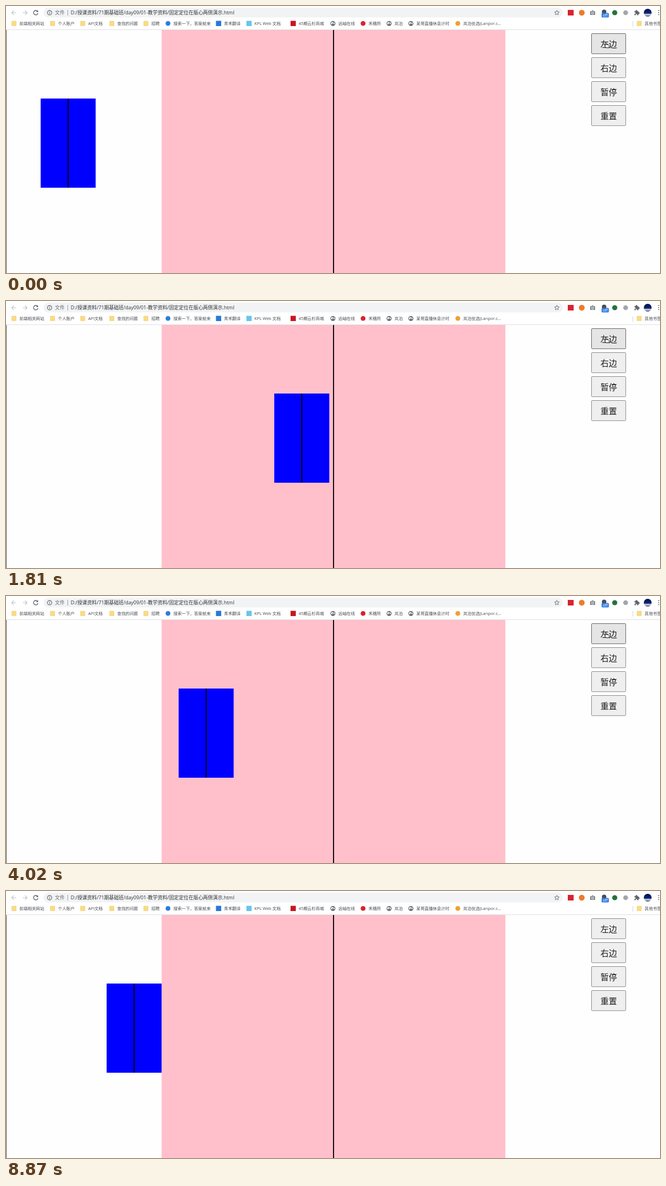
These frames come from a looping animation (1170 px wide and 479 px high, 9240 ms). An HTML page:

```html
<!DOCTYPE html>
<html lang="zh-CN">
<head>
<meta charset="utf-8">
<title>固定定位演示</title>
<style>
  html, body { margin: 0; width: 100%; height: 100%; overflow: hidden; background: #fff; }
  svg { position: absolute; left: 0; top: 0; }
  text { font-family: "Open Sans", "Noto Sans CJK SC", "Noto Sans CJK", sans-serif; }
  .address { font-size: 8.7px; fill: #303134; }
  .bookmark { font-size: 7.4px; fill: #46494d; }
  .button text { font-size: 14.8px; text-anchor: middle; fill: #1c1c1c; }
  .button rect { fill: #efefef; stroke: #8c8c8c; }
  .icon { fill: none; stroke: #5f6368; stroke-width: 1.1; }
  .crisp { shape-rendering: crispEdges; }

  #box { animation: slide 9.24s infinite; }
  .first rect { animation: button 9.24s step-end infinite; }
  #hand { animation: hand 9.24s step-end infinite; }
  #arrow { animation: arrow 9.24s step-end infinite; }

  /* Three linear moves: to the centre, back half the column, back half the box. */
  @keyframes slide {
    0% { transform: translateX(62px); animation-timing-function: step-end; }
    3.95% { transform: translateX(62px); animation-timing-function: steps(25); }
    21.537% { transform: translateX(536.9px); animation-timing-function: step-end; }
    30.79% { transform: translateX(527.4px); animation-timing-function: steps(24); }
    47.619% { transform: translateX(236px); animation-timing-function: step-end; }
    48.323% { transform: translateX(229.2px); animation-timing-function: step-end; }
    56.872% { transform: translateX(228.7px); animation-timing-function: steps(24); }
    73.593% { transform: translateX(181px); animation-timing-function: step-end; }
    74.297%, 100% { transform: translateX(180px); animation-timing-function: step-end; }
  }
  @keyframes button {
    0%, 3.571% { fill: #e5e5e5; stroke: #666; }
    2.164% { fill: #f5f5f5; stroke: #9c9c9c; }
    87.12%, 100% { fill: #efefef; stroke: #8c8c8c; }
  }
  @keyframes hand {
    0% { visibility: visible; }
    87.12%, 100% { visibility: hidden; }
  }
  @keyframes arrow {
    0% { visibility: hidden; transform: translate(1082px, 88px); }
    87.12% { visibility: visible; transform: translate(1082px, 88px); }
    87.825% { visibility: visible; transform: translate(1115px, 172px); }
    88.528% { visibility: visible; transform: translate(1151px, 264px); }
    89.177% { visibility: hidden; transform: translate(1166px, 476px); }
    95.238% { visibility: visible; transform: translate(1166px, 476px); }
    95.995%, 100% { visibility: hidden; transform: translate(1166px, 476px); }
  }
</style>
</head>
<body>
<svg width="1170" height="479" viewBox="0 0 1170 479">
  <defs>
    <linearGradient id="night" x2="0" y2="1">
      <stop offset="0" stop-color="#06104a"/>
      <stop offset=".55" stop-color="#0d2270"/>
      <stop offset=".75" stop-color="#d5def0"/>
      <stop offset="1" stop-color="#26355f"/>
    </linearGradient>
    <path id="folder" d="M-3.8-4H3.8V4H-3.8Z" fill="#fbdc83" stroke="#e9bf52" stroke-width=".6"/>
    <g id="globe">
      <circle r="4.4" fill="#5f6368"/>
      <path d="M-3-1.8L-.6-2.8.6-1-1 .4-1.6 2.4-3.2.6ZM1.5-2.8L3.2-.6 2.6 1.6.8 1Z" fill="#fff"/>
    </g>
  </defs>

  <!-- Toolbar -->
  <g class="icon">
    <path d="M18 12H10.5M14 8.2L10.2 12 14 15.8M30 12H37.5M34 8.2L37.8 12 34 15.8" stroke="#bdc1c6"/>
    <path d="M56.2 9.2A4 4 0 1 0 57.2 13" stroke-width="1.3"/>
    <path d="M57.4 7.4V11H53.8Z" fill="#5f6368" stroke="none"/>
  </g>
  <rect x="67" y="3" width="929" height="17.5" rx="8.7" fill="#f1f3f4"/>
  <g class="icon">
    <circle cx="78" cy="12" r="3.9"/>
    <path d="M78 11.3V14.2M78 9.4V10.4"/>
    <path d="M110.5 7V17" stroke="#9aa0a6" stroke-width="1"/>
    <path d="M985.5 7.7L986.7 10.5 989.7 10.8 987.4 12.8 988.1 15.8 985.5 14.2 982.9 15.8 983.6 12.8 981.3 10.8 984.3 10.5Z" stroke-width=".9"/>
  </g>
  <text class="address" x="87.5" y="15" fill-opacity=".7">文件</text>
  <text class="address" x="115.8" y="15">D:/授课资料/71期基础班/day09/01-教学资料/固定定位在版心两侧演示.html</text>

  <!-- Extensions -->
  <rect x="1005" y="7" width="10.5" height="10" fill="#d9232e"/>
  <circle cx="1030" cy="12" r="5.2" fill="#ee7c2b"/>
  <path d="M1045 9.5H1047.3L1048.2 8H1050.8L1051.7 9.5H1054V16H1045Z" fill="#80868b"/>
  <circle cx="1049.5" cy="12.6" r="1.9" fill="#80868b" stroke="#fff"/>
  <circle cx="1070" cy="10.5" r="4" fill="#4a4e55"/>
  <rect x="1065.5" y="12.5" width="13" height="8" rx="1.5" fill="#2f7de1"/>
  <text x="1072" y="18.8" font-size="6.8" text-anchor="middle" fill="#fff">off</text>
  <circle cx="1089" cy="12" r="4.6" fill="#25733b"/>
  <circle cx="1108.5" cy="12" r="4.3" fill="#a3a6aa"/>
  <path d="M1124.3 9.3H1126.5A1.5 1.5 0 1 1 1129.3 9.3H1131.5V11.3A1.5 1.5 0 1 1 1131.5 14.1V16.5H1129A1.4 1.4 0 1 0 1126.7 16.5H1124.3V14A1.4 1.4 0 1 0 1124.3 11.5Z" fill="#5f6368"/>
  <circle cx="1148" cy="12" r="7" fill="url(#night)"/>
  <path d="M1166.7 7.2h1.7v1.7h-1.7zm0 3.7h1.7v1.7h-1.7zm0 3.7h1.7v1.7h-1.7z" fill="#5f6368"/>

  <g id="bookmarks"></g>
  <path class="crisp" d="M1121.5 26.5V36.5" stroke="#d5d7da"/>

  <!-- Page -->
  <rect y="43" width="1170" height="436" fill="#fefefe"/>
  <g class="crisp">
    <path d="M0 42.5H1170" stroke="#dfe1e3"/>
    <path d="M.5 43V479" stroke="#555"/>
  </g>
  <rect x="278.4" y="43" width="615" height="436" fill="#ffc0cb"/>
  <rect x="585" y="43" width="1.85" height="436" fill="#000"/>
  <g id="buttons"></g>

  <g id="box">
    <rect y="166" width="98.4" height="160" fill="#00f"/>
    <rect x="48.3" y="166" width="1.85" height="160" fill="#000"/>
  </g>

  <path id="hand" d="M1072.2 65.2Q1073.3 64.4 1073.9 65.5V69L1078.2 69.9Q1079.4 70.3 1079.2 71.6L1078.2 75H1073.4L1070.3 71.3Q1070.5 70 1072.2 71Z" fill="#fff" fill-opacity=".6" stroke="#000" stroke-width=".7"/>
  <path id="arrow" d="M0 0V10.4L2.4 8.2 4 11.8 5.5 11.1 4 7.6H7.4Z" fill="#fff" stroke="#000" stroke-width=".7"/>
</svg>

<script>
  const svgNS = "http://www.w3.org/2000/svg";

  function add(parent, tag, attributes, text = "") {
    const node = document.createElementNS(svgNS, tag);
    for (const [name, value] of Object.entries(attributes)) node.setAttribute(name, value);
    node.textContent = text;
    return parent.appendChild(node);
  }

  // Text start, label, icon: a symbol id, or a shape with its colour.
  const bookmarks = [
    [24, "前端相关网站", "folder"],
    [93, "个人账户", "folder"],
    [147, "API文档", "folder"],
    [199, "查找的问题", "folder"],
    [260, "招聘", "folder"],
    [299.5, "搜索一下，答案就来", "circle", "#2b7de0"],
    [390, "青禾翻译", "rect", "#2878dc"],
    [444.5, "KPL Web 文档", "rect", "#6bc4ec"],
    [523.5, "45期云杉商城", "rect", "#c9151e"],
    [594.5, "远岫在线", "globe"],
    [648.5, "禾穗所", "circle", "#d8232f"],
    [695, "岚泊", "globe"],
    [734, "某哥直播休息计时", "globe"],
    [818, "岚泊优选(Lanpor.c...", "circle", "#f0a030"],
    [1142.5, "其他书签", "folder"]
  ];
  const bar = document.getElementById("bookmarks");
  for (const [x, label, icon, fill] of bookmarks) {
    const cx = x - 9.7, cy = 31.3;
    if (icon === "circle") add(bar, "circle", { cx, cy, r: 4.3, fill });
    else if (icon === "rect") add(bar, "rect", { x: cx - 4.7, y: cy - 4.7, width: 9.4, height: 9.4, fill });
    else add(bar, "use", { href: "#" + icon, x: cx, y: cy });
    add(bar, "text", { x, y: 34.1, class: "bookmark" }, label);
  }

  const buttons = document.getElementById("buttons");
  ["左边", "右边", "暂停", "重置"].forEach((label, i) => {
    const y = 49.5 + 43 * i;
    const group = add(buttons, "g", { class: i ? "button" : "button first" });
    add(group, "rect", { x: 1047.5, y, width: 61.2, height: 36.2, rx: 1.5 });
    add(group, "text", { x: 1078.2, y: y + 24.6 }, label);
  });
</script>
</body>
</html>
```
